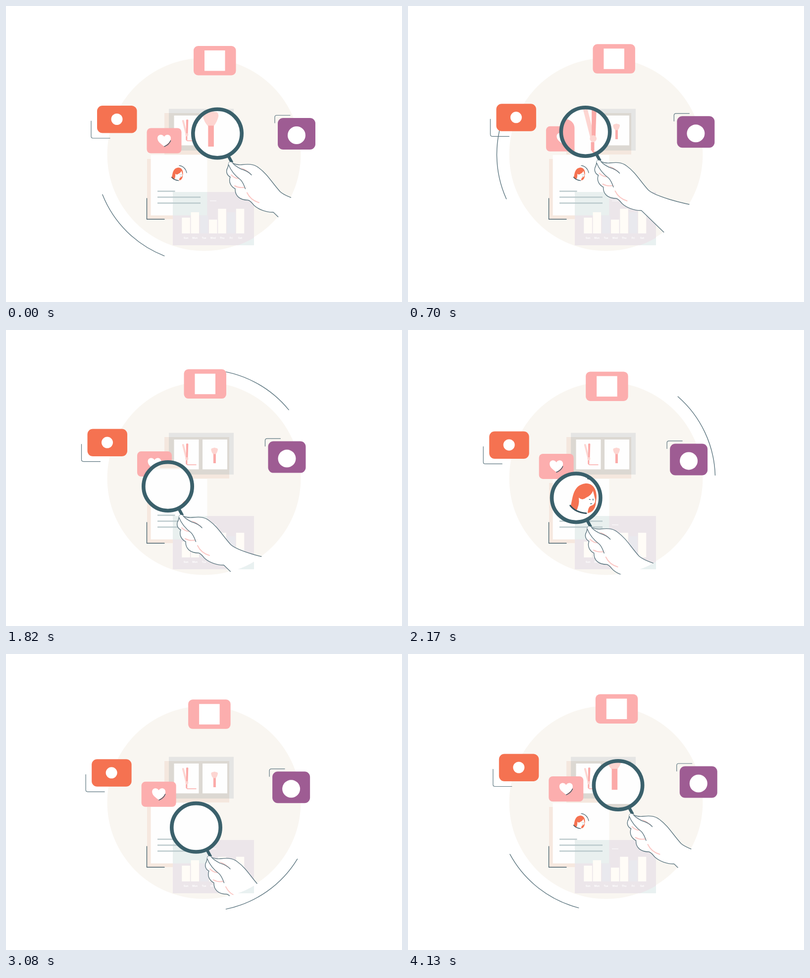
An HTML page for the animation above (4200 ms loop, 800x600 px).

```html
<!DOCTYPE html>
<html lang="en">
<head>
<meta charset="utf-8">
<title>Social research</title>
<style>
  html, body { margin: 0; width: 100%; height: 100%; overflow: hidden; background: #fff; }
  svg { display: block; width: 800px; height: 600px; }
  .line { fill: none; stroke: #5f7882; stroke-width: 1.4; stroke-linecap: round; stroke-linejoin: round; }
  .pink { fill: none; stroke: #fbc8c5; stroke-width: 2; stroke-linecap: round; }
  .days { font: 700 5px Inter, Roboto, sans-serif; fill: #fff; text-anchor: middle; }
</style>
</head>
<body>
<svg viewBox="0 0 800 600">
  <defs>
    <clipPath id="disc"><circle cx="400" cy="301" r="196.5"/></clipPath>
    <clipPath id="glass"><circle r="47"/></clipPath>
    <clipPath id="face"><circle cx="347" cy="340" r="14"/></clipPath>
  </defs>

  <g id="scene">
    <circle cx="400" cy="301" r="195.5" fill="#f9f6f1"/>

    <!-- beauty tools -->
    <path d="M320 217H451V301H320Z" fill="#f4e7de"/>
    <path d="M329 208.5H460V293H329Z" fill="#e5e5e4"/>
    <path d="M329 217H451V293H329Z" fill="#dcd8d2"/>
    <path d="M339.5 222h50v60.5h-50ZM397 222h50v60.5h-50Z" fill="#fefefe"/>
    <path d="M355.7 232.5Q357.5 230 359.5 232L366.5 259.5 363.5 263Z" fill="#fdd5d1"/>
    <path d="M364 231Q366 229 368.3 231L367.3 260 364 263Z" fill="#fbaaa8"/>
    <path d="M364.8 264V271.5" stroke="#fbaaa8" stroke-width="3"/>
    <path d="M364.5 270Q364.5 273.3 367.5 273.3H384.5" fill="none" stroke="#fbaaa8" stroke-width="1.5"/>
    <circle cx="365.3" cy="261" r="3" fill="#fdd5d1"/>
    <path d="M414.3 243Q414.5 239 418 239.5 421 237.5 424.5 239.5 428 239 428 243 427 248 423.8 252H418.8Q415 248 414.3 243Z" fill="#fdd5d1"/>
    <path d="M418.9 251.5h5v18.5h-5Z" fill="#fbaaa8"/>

    <!-- profile page -->
    <path d="M285 310H399V432H285Z" fill="#f6e8df"/>
    <path d="M292.5 302H406.5V424.5H292.5Z" fill="#fefefe"/>
    <path class="line" d="M284.5 390V432.3H320" style="stroke:#4b6570"/>
    <g clip-path="url(#face)">
      <path d="M334 350C337 344 335 329 348 327.500 356 327 359 336 357 344 357 350 353 354 349 354Z" fill="#f57251"/>
      <path d="M342 340Q345 343 348.500 340 353 338 354.500 334L356.500 342Q356.500 346.500 352 347.500 350 349 349.800 354L339 353Q343 347 342 340Z" fill="#fff"/>
      <path d="M351 341.5l1.3.3M354.5 341v1.5M352 345.5l1.7-.2" stroke="#3b606b" stroke-width=".6"/>
    </g>
    <path class="line" d="M334.5 347Q339 353 348.5 353.8" style="stroke:#34525e;stroke-width:1.3"/>
    <path class="line" d="M350 323.3Q362 325 365 338" style="stroke-width:1.3"/>
    <path d="M306 375.5h35.5" stroke="#bccacd" stroke-width="2.3"/>

    <!-- chart -->
    <path d="M337 377H501V485H337Z" fill="#e9f1f1"/>
    <path d="M337 377H501V485H337Z" fill="#ece6ea" clip-path="url(#disc)"/>
    <path d="M337 377H406.5V424.5H337Z" fill="#e9f0ef"/>
    <path d="M306 387.5h87M306 399.5h87" stroke="#bccacd" stroke-width="2.3"/>
    <path d="M412 395h13" stroke="#fff"/>
    <g id="bars"></g>

    <path id="orbit" class="line"/>

    <!-- floating cards -->
    <g id="cards">
      <path class="line" style="stroke-width:1.2" d="M172 233V264Q172 268 176 268H210M543 237V225.5Q543 221.5 547 221.5H574"/>
      <rect x="379" y="81" width="85.5" height="59.5" rx="9" fill="#fcaeae"/>
      <rect x="401" y="90" width="41.5" height="41.5" fill="#fff"/>
      <rect x="184" y="202" width="80.5" height="55.5" rx="11" fill="#f57251"/>
      <circle cx="224" cy="229.5" r="11.5" fill="#fff"/>
      <rect x="549" y="227" width="76" height="64" rx="11" fill="#9e5c93"/>
      <circle cx="587" cy="262" r="18" fill="#fff"/>
      <rect x="284.5" y="247.5" width="70" height="51" rx="8" fill="#fcaeae"/>
      <path d="M319.5 284.5C312 279 306 274.5 306 268 306 260 316 258.5 319.5 265 323 258.5 333 260 333 268 333 274.5 327 279 319.5 284.5Z" fill="#fff"/>
      <path class="line" d="M319.8 284.8Q329 281.5 332.5 273" style="stroke:#34525e"/>
    </g>
  </g>

  <g id="tool">
    <path d="M22 45L29.5 59" stroke="#3a606b" stroke-width="6"/>
    <g clip-path="url(#glass)">
      <circle r="48" fill="#fff"/>
      <use id="zoom" href="#scene"/>
    </g>
    <circle r="49.2" fill="none" stroke="#3a606b" stroke-width="7.6"/>
  </g>

  <g clip-path="url(#disc)">
    <g id="hand">
      <path class="line" style="fill:#fff" d="M22.500 63C22 58 27 56 31 60 37 63 43 64 51 63 60 62 73 61 83 69 102 83 109 98 127 118 140 130 190 145 241 153L360 175V400L169 214 113 159.500C99 160 83 154 74 145.500 69 140 67 136 62 135 46 135 35.500 127 36 112 28 108 22 99 26 88 18 84 17 75 21 69Z"/>
      <path class="pink" d="M28 84Q36 92 45 91M35 106Q46 112 58 108M60 120Q67 135 84 140"/>
      <path d="M46 69Q54 70 64 78L68 82Q56 78 46 69Z" fill="#fbc8c5"/>
      <path d="M22.500 63C22 58 27 56 31 60L69 83 56.500 112C54 105 51 98 47 94 39 88 28 77 22.500 63Z" fill="#fff"/>
      <path class="line" d="M31 60C36 66 42 69 48 72Q62 76 69 84"/>
      <path class="line" d="M22.500 63C28 77 39 88 47 94 51 98 54 105 56.500 112"/>
    </g>
  </g>
</svg>

<script>
const LOOP = 4200, STEP = 70, ZOOM = 2.3, ORBIT = 220.6;
const $ = id => document.getElementById(id);

// time, lens x, lens y, cards dx, cards dy, orbit angle
const keys = [
  [0, 427, 258.5, 0, 0, 0],
  [700, 358.5, 255, -5.6, -3.7, 44.6],
  [1190, 315.5, 268.5, -10.8, -4.5, 83],
  [1820, 327, 317, -19.5, -1.4, 162.5],
  [2520, 355, 355.5, -18, 8.2, 233.4],
  [3640, 410.5, 318.5, -3.2, 8.8, 320.4],
  [4130, 424.5, 266, -0.2, 0.5, 353.2]
];

// key n of the endless sequence, wrapped in time and angle
function key(n) {
  const len = keys.length, turn = Math.floor(n / len);
  const k = keys[n - turn * len].slice();
  k[0] += turn * LOOP;
  k[5] += turn * 360;
  return k;
}

function slope(n, c) {
  const a = key(n - 1), b = key(n), d = key(n + 1);
  const h0 = b[0] - a[0], h1 = d[0] - b[0];
  return ((b[c] - a[c]) / h0 * h1 + (d[c] - b[c]) / h1 * h0) / (h0 + h1);
}

// smooth cubic through the keys
function value(c, t) {
  let n = keys.length - 1;
  while (keys[n][0] > t) n--;
  const a = key(n), b = key(n + 1), h = b[0] - a[0], u = (t - a[0]) / h;
  const v = u * u * (3 - 2 * u);
  return a[c] * (1 - v) + b[c] * v
    + h * u * (1 - u) * ((1 - u) * slope(n, c) - u * slope(n + 1, c));
}

function drawBars() {
  const days = ["Sun", "Mon", "Tue", "Wed", "Thu", "Fri", "Sat"];
  const tops = [429, 418, 425, 433, 411, 418, 411];
  $("bars").innerHTML = days.map((day, i) => {
    const x = 355.3 + i * 18.25, fill = i === 2 || i === 5 ? "#e9e9ee" : "#fffcf7";
    return `<rect x="${x}" y="${tops[i]}" width="16.5" height="${461 - tops[i]}" fill="${fill}"/>
      <text class="days" x="${x + 8.2}" y="472">${day}</text>`;
  }).join("");
}

function orbitPath(turn) {
  const point = deg => {
    const r = deg * Math.PI / 180;
    return `${400 + ORBIT * Math.cos(r)} ${301 + ORBIT * Math.sin(r)}`;
  };
  return `M${point(turn + 111.3)}A${ORBIT} ${ORBIT} 0 0 1 ${point(turn + 158.4)}`;
}

function draw(t) {
  const [x, y, dx, dy, turn] = [1, 2, 3, 4, 5].map(c => value(c, t));
  const at = `translate(${x} ${y})`;
  $("tool").setAttribute("transform", at);
  $("hand").setAttribute("transform", at);
  $("zoom").setAttribute("transform", `scale(${ZOOM}) translate(${-x} ${-y})`);
  $("cards").setAttribute("transform", `translate(${dx} ${dy})`);
  $("orbit").setAttribute("d", orbitPath(turn));
}

drawBars();
const start = performance.now();
function tick() {
  const t = (performance.now() - start) % LOOP;
  draw(Math.floor(t / STEP) * STEP);
  requestAnimationFrame(tick);
}
tick();
</script>
</body>
</html>
```
